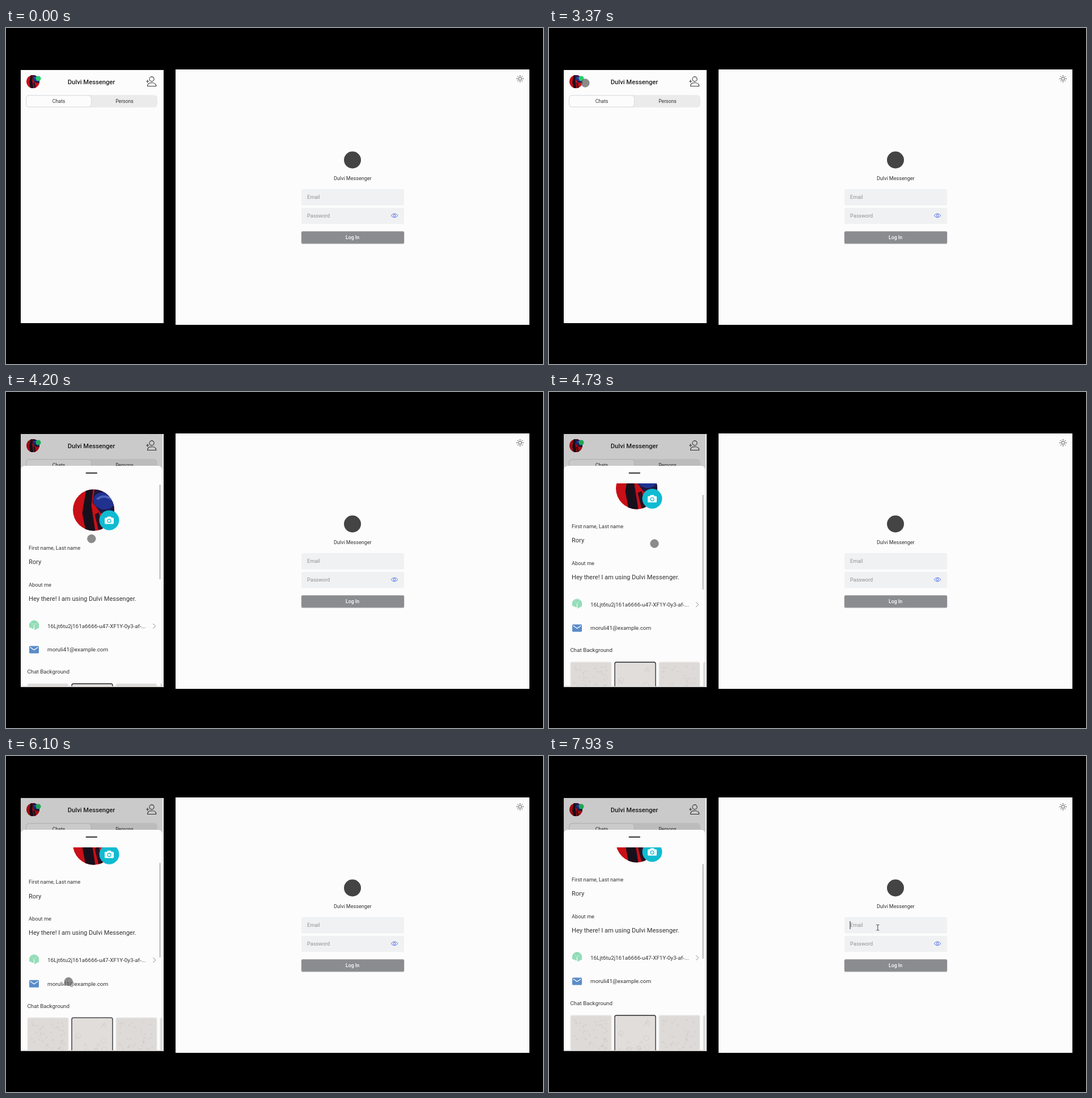
Recreate the animation shown at these times as an HTML page. Size 947 by 592 pixels, loop 8 s.

```html
<!DOCTYPE html>
<html lang="en">
<head>
<meta charset="utf-8">
<title>Messenger</title>
<style>
html, body { margin: 0; width: 100%; height: 100%; overflow: hidden; background: #000; }
svg { display: block; width: 100vw; height: 100vh; }
text { font-family: Roboto, "Open Sans", sans-serif; fill: #333; white-space: pre; }
.line { fill: none; stroke: #3a3a3a; stroke-width: 1.1; stroke-linecap: round; stroke-linejoin: round; }
</style>
</head>
<body>
<svg id="stage" viewBox="0 0 947 592"></svg>
<script>
const LOOP = 8000;
const APP = 'Dulvi Messenger';
const SHEET_TOP = 130, PHONE_BOTTOM = 520;

// Text whose visual middle sits on y.
const label = (x, y, size, str, attrs = '') =>
  `<text x="${x}" y="${(y + size * 0.35).toFixed(2)}" font-size="${size}" ${attrs}>${str}</text>`;
const centred = (x, y, size, str, attrs = '') =>
  label(x, y, size, str, `text-anchor="middle" ${attrs}`);
const rect = (x, y, w, h, r, fill, attrs = '') =>
  `<rect x="${x}" y="${y}" width="${w}" height="${h}" rx="${r}" fill="${fill}" ${attrs}/>`;
const circle = (x, y, r, fill, attrs = '') =>
  `<circle cx="${x}" cy="${y}" r="${r}" fill="${fill}" ${attrs}/>`;
const line = (d, attrs = '') => `<path class="line" d="${d}" ${attrs}/>`;

function seeded(seed) {
  return () => (seed = (seed * 16807) % 2147483647) / 2147483647;
}

const avatar = (x, y, r) => `
  <g transform="translate(${x} ${y}) scale(${r / 36.5})" clip-path="url(#disc)">
    ${rect(-37, -37, 74, 74, 0, '#c90f17')}
    <path d="M-13-37H-1L-4-8L3 37H-14L-20 5Z" fill="#17101c"/>
    <path d="M2-37H37V8L12 5L-2-14Z" fill="#1b1740"/>
    <ellipse cx="18" cy="-16" rx="19" ry="15" fill="#20318f" transform="rotate(12 18 -16)"/>
    <path d="M6-19Q18-29 34-18" fill="none" stroke="#4a63bd" stroke-width="4"/>
    <path d="M9 4L17 37H9L2 8Z" fill="#271022"/>
  </g>`;

function sunIcon(x, y) {
  let d = '';
  for (let i = 0; i < 8; i++) {
    const c = Math.cos(i * Math.PI / 4), s = Math.sin(i * Math.PI / 4);
    d += `M${x + 4.6 * c} ${y + 4.6 * s}L${x + 6 * c} ${y + 6 * s}`;
  }
  return circle(x, y, 2.7, 'none', 'stroke="#444"') + line(d, 'style="stroke-width:1"');
}

function fingerprint(x, y) {
  let d = '';
  for (let r = 1.6; r < 8; r += 2) {
    const h = 7.6 - r * 0.55;
    d += `M${x - r} ${y + h * 0.7}V${y - 1}A${r} ${r * 1.05} 0 0 1 ${x + r} ${y - 1}V${y + h}`;
  }
  return line(d, 'style="stroke:#4fc98a;stroke-width:1.2"');
}

const mailIcon = (x, y) => rect(x - 8.5, y - 6.5, 17, 13, 1.5, '#5a8cc8') +
  line(`M${x - 6.5} ${y - 4}L${x} ${y + 0.5}L${x + 6.5} ${y - 4}`, 'style="stroke:#fff;stroke-width:1.3"');

const cameraIcon = (x, y) => circle(x, y, 17.5, '#0fbbd1') +
  rect(x - 8, y - 4.5, 16, 11, 1.5, '#fff') + rect(x - 3.5, y - 6.5, 7, 4, 1, '#fff') +
  circle(x, y + 1, 3.6, '#0fbbd1') + circle(x, y + 1, 2.3, '#fff');

function tile(x, y, big, seed) {
  const rnd = seeded(seed), n = big ? 24 : 70, size = big ? 4.5 : 1.6;
  let d = '';
  for (let i = 0; i < n; i++) {
    const px = x + 7 + rnd() * 58, py = y + 7 + rnd() * 86, k = size * (0.5 + rnd() * 0.6);
    d += rnd() < 0.5
      ? `M${px - k} ${py}a${k} ${k} 0 1 0 ${2 * k} 0a${k} ${k} 0 1 0 ${-2 * k} 0`
      : `M${px - k} ${py + k}l${k} ${-2 * k}l${k} ${2 * k}`;
  }
  return rect(x, y, 72, 100, 3, big ? '#e1ddda' : '#dedad7',
    `stroke="${big ? '#25252a' : '#e9e8e7'}" stroke-width="1.3"`) +
    line(d, 'style="stroke:#cbc6c3;stroke-width:.6"');
}

const phone = `
  ${rect(26, 74, 252, 446, 0, '#fcfcfc')}
  ${avatar(47.5, 94.5, 11.5)}
  ${circle(57, 89, 4.5, '#25cf6c')}
  ${centred(150.5, 94.7, 11.2, APP, 'font-weight="500" style="fill:#222"')}
  ${circle(257, 90, 4.1, 'none', 'class="line"')}
  ${line('M249.5 102.5C249.5 98 252.5 96.5 257 96.5S264.7 98 264.7 102.5ZM247.5 94H251.7M249.6 91.9V96.1')}
  ${rect(35, 118, 232, 22, 6, '#ebebeb')}
  ${rect(35.5, 118.8, 115, 20.4, 5.5, '#fcfcfc', 'stroke="#d8d9e0"')}
  ${centred(93, 129.2, 8.7, 'Chats')}
  ${centred(209, 129.2, 8.7, 'Persons')}
  <g id="dim" opacity="0">${rect(26, 74, 250, 446, 0, '#000')}</g>
  ${rect(276.4, 74, 1, 446, 0, '#e6e6e6')}`;

const profile = `
  ${avatar(154.5, 78, 36.5)}
  ${cameraIcon(182, 96)}
  ${label(40, 145, 9.25, 'First name, Last name')}
  ${label(40, 169.5, 11, 'Rory')}
  ${label(40, 210, 9.25, 'About me')}
  ${label(40, 234, 11.05, `Hey there! I am using ${APP}.`)}
  ${fingerprint(49.5, 282)}
  ${label(73, 282.5, 9.87, '16Ljt6tu2j161a6666-u47-XF1Y-0y3-af-...')}
  ${line('M259.5 278.5L263.7 282.5L259.5 286.5', 'style="stroke:#888;stroke-width:1"')}
  ${mailIcon(49.5, 324)}
  ${label(73, 324, 9.87, 'moruli41@example.com')}
  ${label(37.5, 363, 9.75, 'Chat Background')}
  ${[38, 116, 194, 272].map((x, i) => tile(x, 384, i === 1, 71 + i * 900)).join('')}`;

const sheet = `
  <g id="sheet">
    <path d="M26 460V8Q26 0 34 0H267.5Q275.5 0 275.5 8V460Z" fill="#fcfcfc"/>
    ${rect(140.5, 11.8, 20.5, 2, 1, '#2a2a30')}
    <g clip-path="url(#list)"><g id="content">${profile}</g></g>
    <g id="thumb">${rect(270.6, 33, 2, 167, 1, '#b4b4b4')}</g>
  </g>`;

const field = (y, name) => rect(521, y, 181, 28.5, 3, '#f0f1f2') +
  label(531, y + 14.3, 9.1, name, 'style="fill:#8f9193"');

const login = `
  ${rect(299, 73, 624, 450, 0, '#fcfcfc')}
  ${sunIcon(906.5, 89.5)}
  ${circle(611, 232.5, 15, '#444')}
  ${centred(611.3, 264.5, 9.05, APP)}
  ${field(284, 'Email')}
  ${field(316.8, 'Password')}
  <path d="M679 330.5Q685 323.6 691 330.5Q685 337.4 679 330.5Z" fill="none" stroke="#5b7cf0"/>
  ${circle(685, 330.5, 1.9, 'none', 'stroke="#5b7cf0"')}
  ${rect(520.5, 359, 182, 22, 2.5, '#d6d6d8')}
  ${rect(521, 358.3, 181, 21.4, 2, '#8b8c8f')}
  ${centred(611, 369, 8.7, 'Log In', 'font-weight="500" style="fill:#fff"')}
  <g id="focus">
    ${rect(530.5, 291, 1, 14, 0, '#222')}
    ${line('M577.5 297.5H579L579.8 298L580.6 297.5H582M579.8 298V306.5M577.5 307H579L579.8 306.5L580.6 307H582', 'style="stroke:#333;stroke-width:.9"')}
  </g>`;

const stage = document.getElementById('stage');
stage.innerHTML = `
  <defs>
    <clipPath id="disc"><circle r="36.5"/></clipPath>
    <clipPath id="list"><rect x="26" y="31" width="249.5" height="420"/></clipPath>
    <clipPath id="screen"><rect x="26" y="74" width="252" height="444.5"/></clipPath>
  </defs>
  ${rect(0, 0, 947, 592, 0, '#000')}
  ${phone}
  <g clip-path="url(#screen)">
    ${sheet}
    <g id="touch">${circle(0, 0, 7.3, '#555', 'fill-opacity=".68" stroke="#777" stroke-opacity=".6"')}</g>
  </g>
  ${login}`;

const part = {};
for (const id of ['dim', 'sheet', 'content', 'thumb', 'focus', 'touch'])
  part[id] = document.getElementById(id);

// Keys: [time, values...]
const touchPath = [
  [2170, 202, 192], [2530, 114, 200], [2670, 114, 200], [3370, 64, 97],
  [3470, 51, 92], [3600, 51, 92], [3830, 83, 143], [4350, 178, 305],
  [4450, 186, 305], [4730, 186, 267], [5130, 170, 300], [5630, 98, 397],
  [6400, 118, 398], [6830, 118, 398], [7050, 81, 400], [7500, 268, 349]
];
const scrollPath = [[4450, 0], [4730, 38], [5130, 43], [5630, 48.5], [5950, 48.5], [6250, 57]];

function along(keys, t) {
  if (t <= keys[0][0]) return keys[0].slice(1);
  const i = keys.findIndex(k => k[0] > t);
  if (i < 0) return keys[keys.length - 1].slice(1);
  const a = keys[i - 1], b = keys[i], p = (t - a[0]) / (b[0] - a[0]);
  return a.slice(1).map((v, j) => v + (b[j + 1] - v) * p);
}

// cubic-bezier(.32, .72, 0, 1)
function slideEase(x) {
  if (x <= 0) return 0;
  if (x >= 1) return 1;
  let lo = 0, hi = 1;
  for (let i = 0; i < 24; i++) {
    const u = (lo + hi) / 2;
    if (0.96 * (1 - u) ** 2 * u + u ** 3 < x) lo = u; else hi = u;
  }
  return 2.16 * (1 - lo) ** 2 * lo + 3 * (1 - lo) * lo ** 2 + lo ** 3;
}

const move = (el, x, y) => el.setAttribute('transform', `translate(${x} ${y})`);
const show = (el, on) => el.setAttribute('visibility', on ? 'visible' : 'hidden');

function draw(t) {
  const open = slideEase((t - 3603) / 500);
  const [scroll] = along(scrollPath, t);
  part.dim.setAttribute('opacity', 0.2 * open);
  show(part.sheet, open > 0);
  move(part.sheet, 0, PHONE_BOTTOM + (SHEET_TOP - PHONE_BOTTOM) * open);
  move(part.content, 0, -scroll);
  move(part.thumb, 0, scroll * 0.48);
  move(part.touch, ...along(touchPath, t));
  show(part.touch, t >= 2170 && t < 7500);
  show(part.focus, t >= 7930);
}

const start = performance.now();
function tick() {
  draw((performance.now() - start) % LOOP);
  requestAnimationFrame(tick);
}
tick();
</script>
</body>
</html>
```
